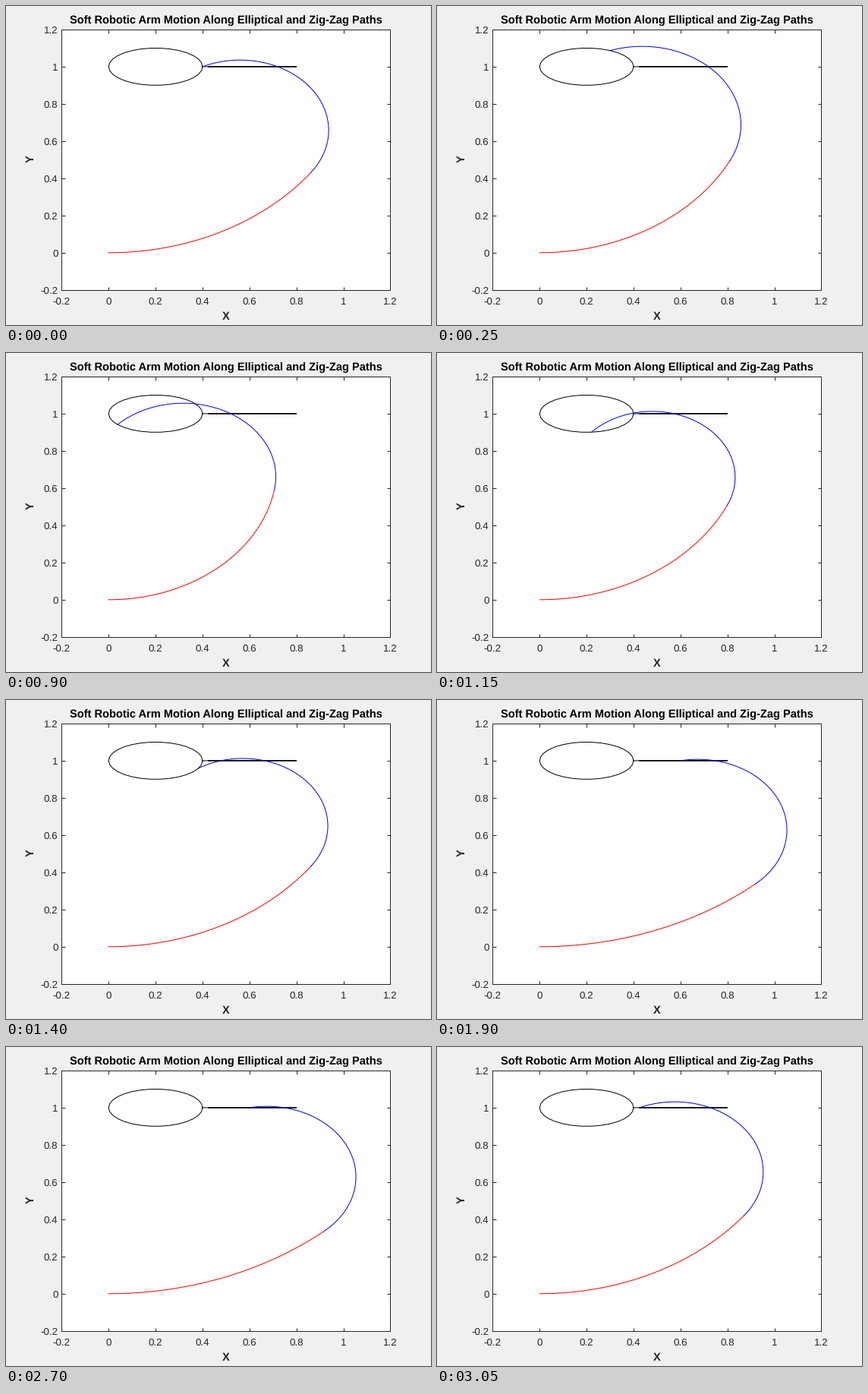
A matplotlib script that plays this animation: 560 by 420 pixels, repeating every 3100 ms.

```python
import numpy as np
import matplotlib.pyplot as plt
from matplotlib.animation import FuncAnimation

W, H, DPI = 560, 420, 80
PX = 72 / DPI  # points per pixel
LEFT, RIGHT, TOP, BOTTOM = 73.4, 506.4, 30.9, 373.8
LO, HI = -0.2, 1.2
INK = "#262626"

plt.rcParams.update({"font.family": "Liberation Sans", "text.hinting": "no_hinting"})


def tip_path():
    """One turn round the ellipse, then out and back along the line."""
    a = np.radians(12 * np.arange(31))
    ellipse = 0.2 + 1j + 0.2 * np.cos(a) + 0.1j * np.sin(a)
    k = np.arange(1, 32)
    line = 0.8 - 0.025 * np.abs(k - 16) + 1j
    return np.concatenate([ellipse, line])


def arc(theta, s=1.0):
    """Point at length s on a unit-length arc that bends by theta."""
    return (np.exp(1j * theta * s) - 1) / (1j * theta)


def reach(a, b):
    return arc(a) + np.exp(1j * a) * arc(b)


def solve(goal, h=1e-6):
    """Newton search for the two bend angles that put the tip on goal."""
    a, b = 0.92, 2.62
    for _ in range(20):
        here = reach(a, b)
        da = (reach(a + h, b) - here) / h
        db = (reach(a, b + h) - here) / h
        jac = [[da.real, db.real], [da.imag, db.imag]]
        err = goal - here
        step = np.linalg.solve(jac, [err.real, err.imag])
        a, b = a + step[0], b + step[1]
    return a, b


fig = plt.figure(figsize=(W / DPI, H / DPI), dpi=DPI, facecolor="#f0f0f0")
ax = fig.add_axes([LEFT / W, 1 - BOTTOM / H, (RIGHT - LEFT) / W, (BOTTOM - TOP) / H])
ax.set(xlim=(LO, HI), ylim=(LO, HI), facecolor="white")
ticks = np.round(np.linspace(LO, HI, 8), 1)
ax.set_xticks(ticks)
ax.set_yticks(ticks)
ax.tick_params(direction="in", top=True, right=True, length=4.5 * PX,
               width=PX, color=INK, labelbottom=False, labelleft=False)
for spine in ax.spines.values():
    spine.set(linewidth=PX, edgecolor=INK)


def label(x, y, text, size=10, ha="center", **kw):
    fig.text(x / W, 1 - y / H, text, fontsize=size * 96 / 72 * PX, ha=ha,
             va="baseline", rotation_mode="anchor", **{"color": INK, **kw})


for v in ticks:
    f = (v - LO) / (HI - LO)
    text = f"{v + 0.0:g}"
    label(LEFT + f * (RIGHT - LEFT), 393, text)
    label(68.5, BOTTOM - f * (BOTTOM - TOP) + 5, text, ha="right")

label(289.5, 24, "Soft Robotic Arm Motion Along Elliptical and Zig-Zag Paths",
      11, weight="bold", color="black")
label(290, 413, "X", 11, weight="bold")
label(37, 201.5, "Y", 11, weight="bold", rotation=90)

path = tip_path()
bends = [solve(p) for p in path]
s = np.linspace(0, 1, 60)

ax.plot(path.real, path.imag, color="black", lw=PX)
lower, = ax.plot([], [], color="red", lw=PX)
upper, = ax.plot([], [], color="blue", lw=PX)


def draw(i):
    a, b = bends[i]
    first = arc(a, s)
    second = first[-1] + np.exp(1j * a) * arc(b, s)
    lower.set_data(first.real, first.imag)
    upper.set_data(second.real, second.imag)
    return lower, upper


anim = FuncAnimation(fig, draw, frames=len(path), interval=50, repeat=True)
plt.show()
```
